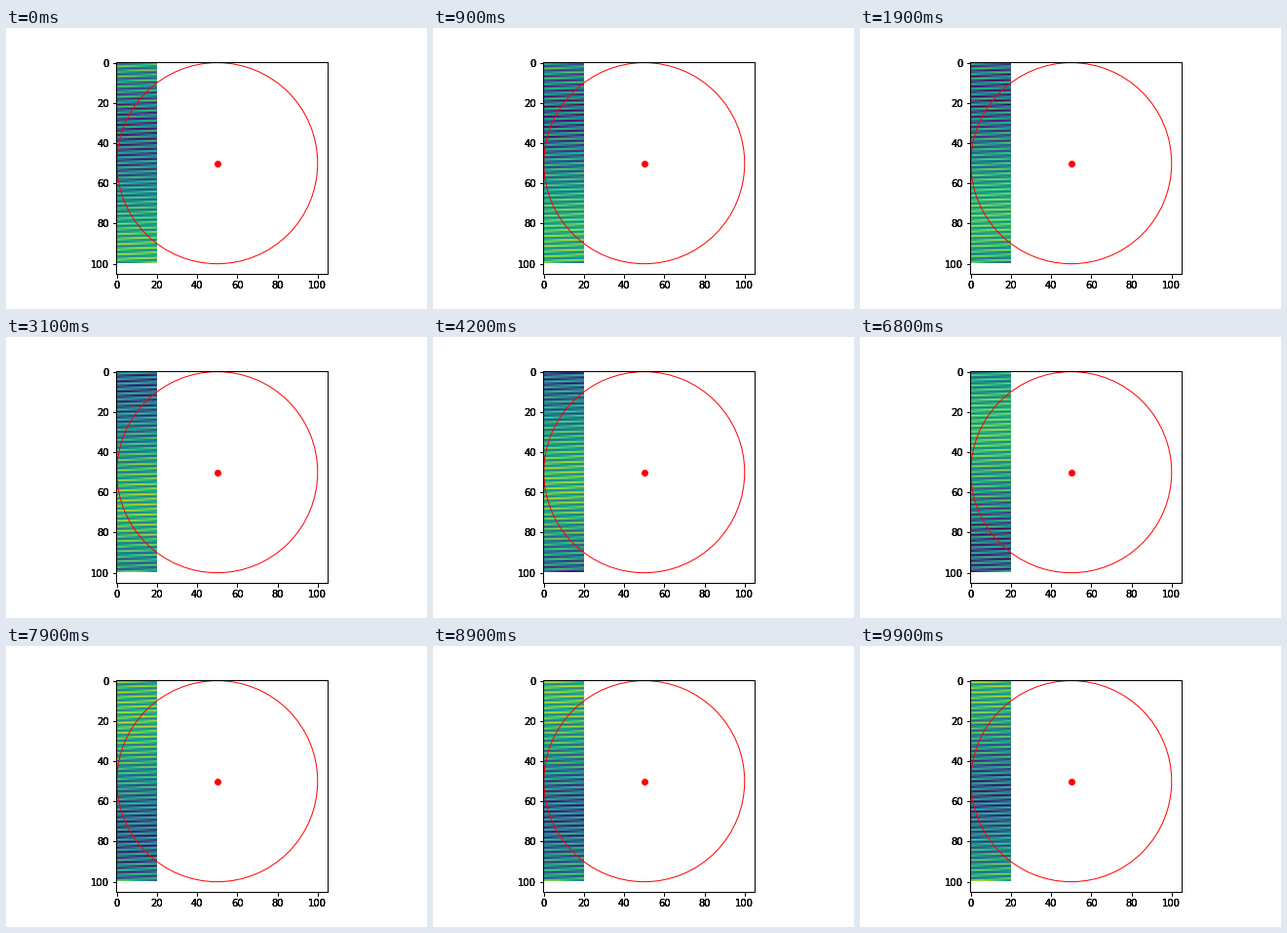
Animation of 432 by 288 pixels, one loop 10000 ms. Source, as a matplotlib script:

```python
import numpy as np
import matplotlib.pyplot as plt
from matplotlib.animation import FuncAnimation
from matplotlib.patches import Circle

FRAMES, INTERVAL = 100, 100
ROWS, COLS = 100, 20
LAYERS = 4  # stacked frames give the labels their heavy edges

row = np.arange(ROWS).reshape(-1, 1)
col = np.arange(COLS)


def signal(n):
    """A sine over a slow swell; the sine is weaker where the swell is high."""
    swell = np.cos(2 * np.pi * (n / COLS - 97) / 120)
    wave = np.cos((n - 1652) / 8)
    return (0.9 - 0.2 * swell) * wave + 0.5 * swell


def window(t):
    """The signal wrapped into rows, scrolled up one row per frame."""
    return signal(COLS * (row + t) + col)


def set_view(ax):
    ticks = range(0, 101, 20)
    ax.set_xticks(ticks)
    ax.set_yticks(ticks)
    ax.set_xlim(-0.5, 105.025)
    ax.set_ylim(105.025, -0.5)
    ax.set_aspect("equal")


plt.rcParams["font.family"] = "DejaVu Sans"
fig = plt.figure(figsize=(6, 4), dpi=72, facecolor="white")
fig.subplots_adjust(left=0.125, right=0.9, bottom=0.125, top=0.88)
ax = fig.add_subplot()

image = ax.imshow(window(0), cmap="viridis", vmin=-1.5, vmax=1.5)
ax.add_patch(Circle((50, 50), 50, fill=False, edgecolor="red", linewidth=1))
ax.plot(50, 50, "ro")
set_view(ax)
for _ in range(LAYERS - 1):
    layer = fig.add_subplot()
    layer.patch.set_visible(False)
    set_view(layer)


def update(t):
    image.set_data(window(t))
    return [image]


anim = FuncAnimation(fig, update, frames=FRAMES, interval=INTERVAL,
                     repeat=True, repeat_delay=0)
plt.show()
```
